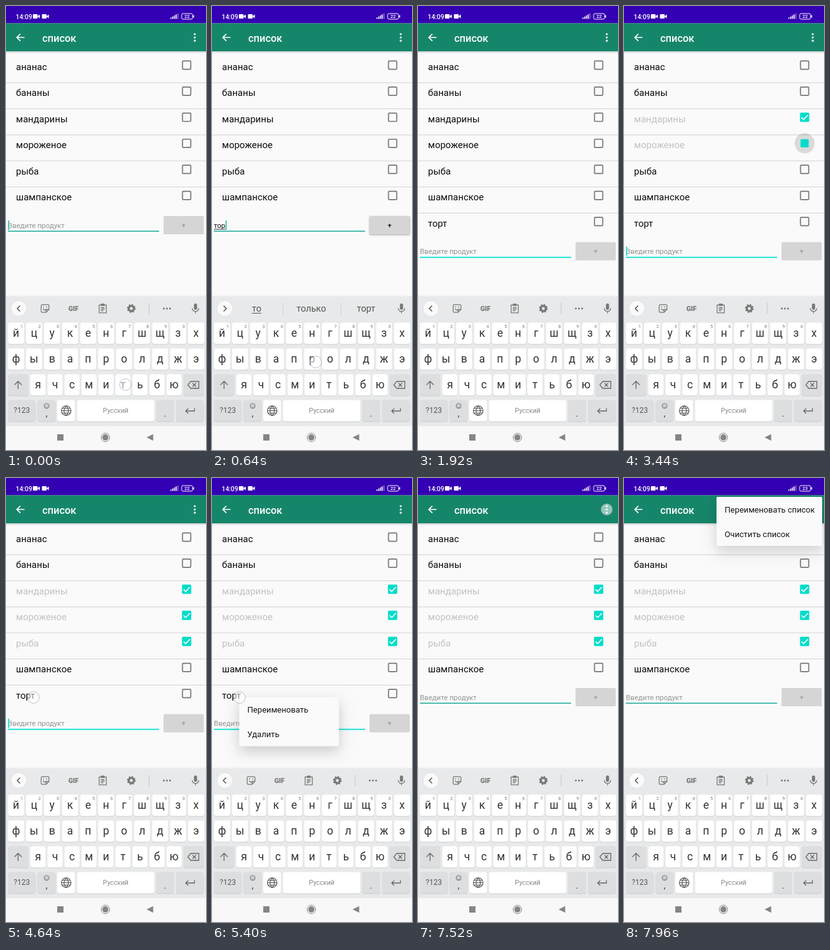
Animation, 320 px wide and 706 px high, one loop 8 s. Source, as an HTML page with a canvas:

```html
<!DOCTYPE html>
<html lang="ru">
<head>
<meta charset="utf-8">
<title>Список</title>
<style>
html, body { margin: 0; width: 100%; height: 100%; overflow: hidden; background: #fafafa; }
canvas { display: block; width: 320px; height: 706px; }
</style>
</head>
<body>
<canvas id="stage" width="320" height="706"></canvas>
<script>
const c = document.getElementById('stage').getContext('2d');
const LOOP = 8000, PITCH = 41.45, TEAL = '#00dcc8', GRAY = '#757575';
const ITEMS = ['ананас', 'бананы', 'мандарины', 'мороженое', 'рыба', 'шампанское', 'торт'];
const CHECKED_AT = { 2: 2940, 3: 3390, 4: 3880 };
const ADD_AT = 1440, DELETE_AT = 6180;
const TYPED = [[400, 'т'], [560, 'то'], [640, 'тор'], [820, 'торт']];
const HINTS = [
  [440, ['т', 'то', 'так']], [600, ['то', 'только', 'торт']],
  [720, ['тор', 'торт', 'торта']], [920, ['торт', 'торты', 'торта']]
];
const BLINKS = [1340, ADD_AT, 1920, 2360, 2860, 3360, 3860, 4360, 4840, 6740, 7180, 7660, 7720];
// x, y, press time, release time
const TOUCHES = [
  [191, 602, 0, 400], [189, 566, 480, 560], [166, 566, 600, 670], [191, 602, 740, 820],
  [284, 349, 1320, 1420], [289, 177, 2840, 2930], [289, 218, 3280, 3380],
  [289, 260, 3760, 3870], [44, 349, 4640, 5680], [76, 405, 6080, 6220], [302, 50, 7520, 7620]
];

const clamp = v => Math.max(0, Math.min(1, v));
const ramp = (t, from, length) => clamp((t - from) / length);
const ease = p => 1 - (1 - p) ** 3;
const latest = (list, t) => list.filter(e => e[0] <= t).pop();

function text(s, x, y, size, color, align = 'left', weight = 400) {
  c.font = `${weight} ${size}px Roboto, sans-serif`;
  c.textAlign = align;
  c.fillStyle = color;
  c.fillText(s, x, y);
}
function rect(x, y, w, h, color, r = 0) {
  c.fillStyle = color;
  c.beginPath();
  c.roundRect(x, y, w, h, r);
  c.fill();
}
function circle(x, y, r, fill, stroke, width = 1) {
  c.beginPath();
  c.arc(x, y, r, 0, 7);
  if (fill) { c.fillStyle = fill; c.fill(); }
  if (stroke) { c.strokeStyle = stroke; c.lineWidth = width; c.stroke(); }
}
function line(d, color, width = 1.3) {
  c.strokeStyle = color;
  c.lineWidth = width;
  c.stroke(new Path2D(d));
}
function shape(d, color) {
  c.fillStyle = color;
  c.fill(new Path2D(d));
}

function drawBars(t) {
  rect(0, 0, 320, 27.5, '#3400b3');
  text('14:09', 15.5, 20.5, 10.4, '#fff', 'left', 500);
  for (const x of [43, 57.5]) {
    rect(x, 13, 7.5, 7, '#fff', 1);
    shape(`M${x + 7} 16.5l4-3v6z`, '#fff');
  }
  for (let i = 0; i < 5; i++)
    rect(263 + i * 2.8, 18.5 - i * 1.7, 1.7, 2 + i * 1.7, i < 4 ? '#fff' : '#8a6bd3');
  c.strokeStyle = '#fff';
  c.lineWidth = 1;
  c.beginPath();
  c.roundRect(281, 12, 17.5, 9, 2.5);
  c.stroke();
  rect(299.5, 14.5, 1.5, 4, '#fff');
  text(t < 7760 ? '22' : '23', 289.7, 19.4, 7.5, '#fff', 'center', 500);

  rect(0, 27.5, 320, 44.5, '#16866a');
  const shade = c.createLinearGradient(0, 72, 0, 76);
  shade.addColorStop(0, 'rgba(0,0,0,.16)');
  shade.addColorStop(1, 'rgba(0,0,0,0)');
  c.fillStyle = shade;
  c.fillRect(0, 72, 320, 4);
  line('M29.5 50H17.5M23 44.3L17.3 50l5.7 5.7', '#fff', 1.7);
  text('список', 58, 56.5, 16.4, '#fff', 'left', 500);
  const glow = ramp(t, 7520, 80) * (1 - ramp(t, 7640, 240));
  circle(302, 50, 16, `rgba(255,255,255,${.2 * glow})`);
  for (const y of [44.8, 50, 55.2]) circle(302, y, 1.6, '#fff');
}

function drawCheckbox(y, t, at) {
  const x = 289, p = t - at;
  const halo = ramp(p, -100, 80) * (1 - ramp(p, 90, 180));
  if (halo) circle(x, y, 16 * ease(ramp(p, -100, 110)), `rgba(0,0,0,${.13 * halo})`);
  if (!(p >= 0)) {
    c.strokeStyle = GRAY;
    c.lineWidth = 1.7;
    c.beginPath();
    c.roundRect(x - 6.6, y - 6.6, 13.2, 13.2, 1.2);
    c.stroke();
    return;
  }
  const size = 7.4 - Math.sin(Math.PI * clamp(p / 140));
  rect(x - size, y - size, size * 2, size * 2, TEAL, 1.6);
  const tick = ramp(p, 80, 120);
  if (tick) {
    c.setLineDash([15 * tick, 20]);
    line(`M${x - 5} ${y + .2}l3.4 3.4 6.8-7`, '#fff', 1.6);
    c.setLineDash([]);
  }
}

function drawList(t, count) {
  ITEMS.slice(0, count).forEach((name, i) => {
    const y = i * PITCH, at = CHECKED_AT[i];
    text(name, 16, 102 + y, 15, t >= at ? '#c2c2c2' : '#0c0c0c');
    drawCheckbox(94 + y, t, at);
    if (i < count - 1) rect(0, 121.5 + y, 320, 1, '#d2d2d2');
  });
}

function drawInput(t, count) {
  const y = (count - 6) * PITCH;
  const typed = t < ADD_AT ? latest(TYPED, t)?.[1] : '';
  const accent = count > 6 ? '#00e0d4' : '#35b5a6';
  text(typed || 'Введите продукт', 3, 353 + y, 11.5, typed ? '#111' : '#929292');
  const width = typed ? c.measureText(typed).width : 0;
  if (typed) rect(3, 354.5, width, 1, '#333');
  rect(3, 357.3 + y, 242, 1.7, accent);
  if (BLINKS.filter(b => b <= t).length % 2 === 0)
    rect(3.4 + width, 341 + y, 1.7, 15, accent);

  c.save();
  if (typed) {
    c.shadowColor = 'rgba(0,0,0,.35)';
    c.shadowBlur = 3;
    c.shadowOffsetY = 1;
  }
  rect(252, 334 + y, 64.5, 29, '#d5d5d5', 1.5);
  c.restore();
  const press = ramp(t, 1320, 100) * (1 - ramp(t, 1440, 240));
  if (press) rect(252, 334 + y, 64.5, 29, `rgba(0,0,0,${.13 * press})`, 1.5);
  text('+', 284.2, 353 + y, 11.5, typed ? '#111' : '#9b9b9b', 'center', 500);
}

function drawStrip(t) {
  const words = t < 1520 && latest(HINTS, t)?.[1];
  const ink = '#777';
  circle(20.5, 481, 12.5, '#fafafa', '#dedede', .8);
  line(words ? 'M18.5 476.5l4.5 4.5-4.5 4.5' : 'M22.5 476.5l-4.5 4.5 4.5 4.5', '#555', 1.5);
  rect(300.7, 473, 5, 10, ink, 2.5);
  line('M298 480.5a5.2 5.2 0 0 0 10.4 0M303.2 485.7v3', ink);
  if (words) {
    words.forEach((w, i) => text(w, [71.5, 159, 246.5][i], 486.3, 14.6, '#555', 'center'));
    c.font = '400 14.6px Roboto, sans-serif';
    const w = c.measureText(words[0]).width;
    rect(71.5 - w / 2, 488, w, 1, '#555');
    for (const x of [113, 206]) rect(x, 472, 1, 18, '#cfcfcf');
    return;
  }
  line('M58 474.8h9q1.7 0 1.7 1.7v6l-4.5 4.7H58q-1.7 0-1.7-1.7v-9q0-1.7 1.7-1.7zM68.7 482.5h-4.5v4.7M59.3 481.5q3 3.5 5 1', ink);
  for (const x of [60, 65]) circle(x, 478.6, .9, ink);
  text('GIF', 108, 484.7, 10.8, ink, 'center', 800);
  line('M149 475.5h11.5v12.3H149zM151.7 479.5h6M151.7 482h6M151.7 484.5h4', ink);
  rect(151.8, 473.3, 6, 3.5, ink, 1);
  circle(200.5, 481, 4.1, null, ink, 3.4);
  c.setLineDash([2.3, 2.41]);
  circle(200.5, 481, 6, null, ink, 2);
  c.setLineDash([]);
  rect(228.5, 472, 1, 18, '#c6c6c6');
  for (const x of [252.5, 257.5, 262.5]) circle(x, 481, 1.5, ink);
}

function key(x, y, w, label, size = 17.5, color = '#fff', ink = '#333') {
  rect(x, y + 1, w, 34, '#cbcdcf', 4);
  rect(x, y, w, 34, color, 4);
  if (label) text(label, x + w / 2, y + 17 + size * .33, size, ink, 'center');
}

function drawKeyboard(t) {
  const shade = c.createLinearGradient(0, 459, 0, 463);
  shade.addColorStop(0, 'rgba(0,0,0,0)');
  shade.addColorStop(1, 'rgba(0,0,0,.07)');
  c.fillStyle = shade;
  c.fillRect(0, 459, 320, 4);
  rect(0, 462, 320, 206, '#e8e9ea');
  drawStrip(t);
  [...'йцукенгшщзх'].forEach((ch, i) => {
    key(3.2 + i * 28.8, 503.5, 25.8, ch);
    if (i < 10) text((i + 1) % 10, 25 + i * 28.8, 512, 7, '#777', 'center');
  });
  [...'фывапролджэ'].forEach((ch, i) => key(3.2 + i * 28.8, 544.5, 25.8, ch));
  [...'ячсмитьбю'].forEach((ch, i) => key(39 + i * 27.2, 585.5, 24.4, ch));
  const dark = '#dcdee0', ink = '#666';
  key(3, 585.5, 33, '', 0, dark);
  key(284, 585.5, 33, '', 0, dark);
  key(3, 626.5, 44.5, '?123', 12, dark, '#555');
  key(50.5, 626.5, 29, '', 0, dark);
  key(82, 626.5, 28.5, '');
  key(113.5, 626.5, 124, 'Русский', 10.6, '#fff', '#8a8a8a');
  key(240, 626.5, 29, '', 0, dark);
  key(272, 626.5, 44.5, '', 0, dark);
  line('M19.3 609v-12M13.5 602.5l5.8-5.8 5.8 5.8', ink);
  line('M295.5 597h13v11h-13l-4.5-5.5zM298.5 599.7l5.6 5.6M304.1 599.7l-5.6 5.6', ink);
  circle(65, 636, 4, null, ink, .9);
  for (const x of [63.5, 66.5]) circle(x, 635, .6, ink);
  line('M63 637.3q2 2 4 0', ink, .8);
  text(',', 65, 653, 15, '#444', 'center');
  text('.', 254.5, 653, 15, '#444', 'center');
  circle(96.3, 643.5, 7.7, null, '#555', 1.2);
  line('M88.6 643.5h15.4M89.8 639.7h13M89.8 647.3h13M96.3 635.8q-7 7.7 0 15.4q7-7.7 0-15.4', '#555', 1.1);
  line('M301.5 639.5v4.5h-14M291.5 640l-4 4 4 4', ink);

  rect(0, 668, 320, 38, '#f8f8f8');
  rect(82, 681, 10, 10, '#858585');
  circle(159, 686, 6.8, null, '#858585', 1);
  circle(159, 686, 4.9, '#858585');
  shape('M225 686l10.5-5.3v10.6z', '#858585');
}

// Panel revealed from one of its upper corners, faded out on dismissal
function drawPopup({ x, y, w, labels, open, close, fromRight, shadow }, t) {
  const p = ease(ramp(t, open, 240)), fade = 1 - ramp(t, close, 220);
  if (!p || !fade) return;
  const pw = w * (.4 + .6 * p), ph = 78 * (.3 + .7 * p);
  const px = fromRight ? x + w - pw : x;
  c.save();
  c.globalAlpha = Math.min(1, p * 1.6) * fade;
  c.shadowColor = `rgba(0,0,0,${shadow * ramp(t, open, 400)})`;
  c.shadowBlur = 22;
  c.shadowOffsetY = 8;
  rect(px, y, pw, ph, '#fafafa', 1.5);
  c.shadowColor = 'transparent';
  c.beginPath();
  c.rect(px, y, pw, ph);
  c.clip();
  const grow = ramp(t, 6100, 200);
  if (!fromRight && grow) {
    c.save();
    c.beginPath();
    c.rect(x, y + 39, w, 39);
    c.clip();
    circle(76 + 48 * Math.min(1, grow * 2), y + 58.5, 100 * grow, '#d8d8d8');
    c.restore();
  }
  labels.forEach((s, i) => text(s, x + 13, y + 24.8 + i * 38.8 - 8 * (1 - p), 13.1, '#151515'));
  c.restore();
}
const POPUPS = [
  { x: 43.5, y: 348.5, w: 159.5, labels: ['Переименовать', 'Удалить'], open: 5160, close: 6240, shadow: .32 },
  { x: 148, y: 30, w: 169, labels: ['Переименовать список', 'Очистить список'], open: 7640, close: 9000, fromRight: true, shadow: .22 }
];

function drawTouches(t) {
  for (const [x, y, down, up] of TOUCHES) {
    if (t < down || t >= up) continue;
    circle(x, y, 9.3, 'rgba(255,255,255,.55)', 'rgba(125,125,170,.5)', 1);
  }
}

function frame() {
  const t = performance.now() % LOOP;
  const count = t >= ADD_AT && t < DELETE_AT ? 7 : 6;
  rect(0, 0, 320, 706, '#fafafa');
  drawBars(t);
  drawList(t, count);
  drawInput(t, count);
  drawKeyboard(t);
  POPUPS.forEach(p => drawPopup(p, t));
  drawTouches(t);
  requestAnimationFrame(frame);
}
frame();
</script>
</body>
</html>
```
